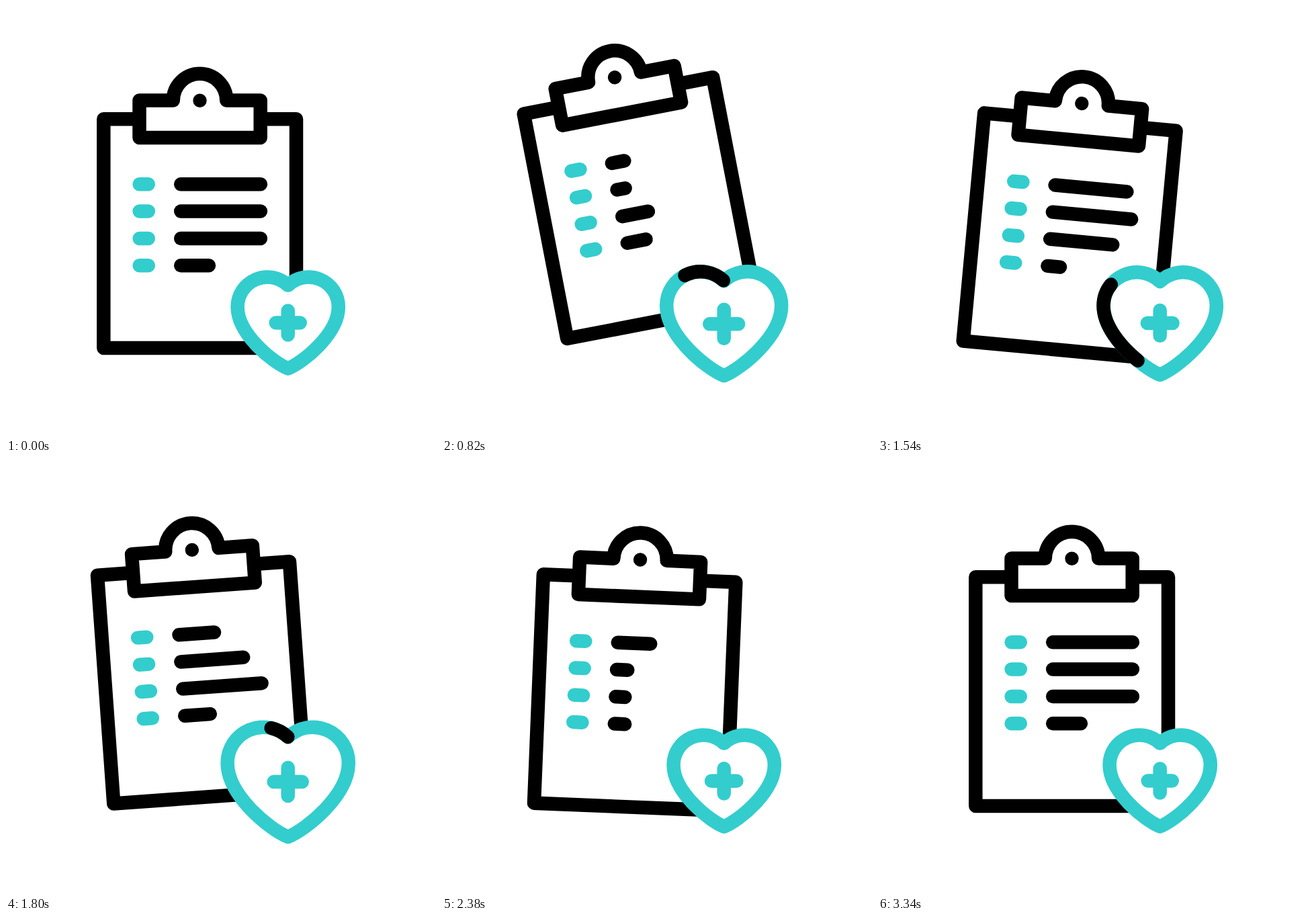
Animation of 640 by 640 pixels, one loop 3600 ms. Source, as an HTML page:

```html
<!DOCTYPE html>
<html lang="en">
<head>
<meta charset="utf-8">
<title>Health checklist</title>
<style>
  html, body { margin: 0; width: 100%; height: 100%; overflow: hidden; background: #fff; }
  svg { display: block; width: 100vw; height: 100vh; }
  .ink, .teal { fill: none; stroke: #000; stroke-width: 20.5; stroke-linecap: round; stroke-linejoin: round; }
  .teal { stroke: #33cdcd; }
  .paper { fill: #fff; }
</style>
</head>
<body>
<svg viewBox="0 0 640 640">
  <g id="board">
    <path class="ink paper" d="M145.3 168.3H432V509H145.3Z"/>
    <path class="ink paper" d="M198.5 140.5H248.8A39.7 39.7 0 0 1 328.2 140.5H378.7V196H198.5Z"/>
    <circle cx="288.5" cy="140.7" r="10.2"/>
  </g>
  <g id="heart"></g>
  <g id="plus"><path class="teal" d="M401.7 471.5h36M419.7 453.5v36"/></g>
</svg>
<script>
const LOOP = 3600, STROKE = 20.5;
const board = document.getElementById('board');
const heart = document.getElementById('heart');
const plus = document.getElementById('plus');

const smooth = x => (x = Math.min(1, Math.max(0, x)), x * x * (3 - 2 * x));
// Eased rise to 1 and back, each taking `half` ms
const bump = (t, start, half) => smooth(1 - Math.abs(t - start - half) / half);
const twoBumps = (t, half) => bump(t, 0, half) + bump(t, 2 * half, half);

function addPath(parent, kind, d) {
  const p = document.createElementNS('http://www.w3.org/2000/svg', 'path');
  p.setAttribute('class', kind);
  p.setAttribute('d', d);
  return parent.appendChild(p);
}

// Checklist rows: a teal bullet and a line that is rewritten
const rows = [];
for (let i = 0; i < 4; i++) {
  const y = 265.3 + 40.3 * i;
  addPath(board, 'teal', `M198.6 ${y}h13.2`);
  rows.push({ y, length: i < 3 ? 118.7 : 41.7, path: addPath(board, 'ink', '') });
}

const heartShape = 'M419.7 415.8A44.4 44.4 0 0 1 494.8 448C494.8 488 442.4 530.5 419.7 539.6' +
  'C397 530.5 344.6 488 344.6 448A44.4 44.4 0 0 1 419.7 415.8Z';
addPath(heart, 'teal paper', heartShape);
const runs = [0, 914].map(start => {
  const path = addPath(heart, 'ink', heartShape);
  path.setAttribute('pathLength', 1);
  return { start, path };
});

// Five half swings, each smaller and quicker than the one before
function swing(t) {
  let start = 154, from = 0;
  for (let n = 0; n < 5; n++) {
    const time = 625 - 24 * n * n;
    const to = 2.8 * (4 - n) * (n % 2 ? 1 : -1);
    if (t < start + time) return from + (to - from) * smooth((t - start) / time);
    start += time;
    from = to;
  }
  return 0;
}

// Scale a group while keeping its line weight
function grow(group, scale) {
  group.setAttribute('transform',
    `translate(419.7 462.5) scale(${scale}) translate(-419.7 -462.5)`);
  for (const p of group.children) p.style.strokeWidth = STROKE / scale;
}

function draw(t) {
  const hop = -43 * bump(t, 0, 600) - 10.5 * bump(t, 1550, 270);
  board.setAttribute('transform', `translate(0 ${hop}) rotate(${swing(t)} 248.6 302.7)`);

  rows.forEach(({ y, length, path }, i) => {
    const shown = 1 - .915 * twoBumps(t - 180 * i, 700);
    path.setAttribute('d', `M260.2 ${y}h${length * shown}`);
  });

  grow(heart, 1 + .2 * twoBumps(t, 600));
  grow(plus, 1 + .2 * twoBumps(t - 150, 600));

  for (const { start, path } of runs) {
    const head = smooth((t - start) / 840);
    const tail = smooth((t - start - 163) / 840);
    path.style.display = head - tail > .0005 ? '' : 'none';
    path.style.strokeDasharray = `${head - tail} 2`;
    path.style.strokeDashoffset = -tail;
  }
}

const begin = performance.now();
function tick() {
  draw((performance.now() - begin) % LOOP);
  requestAnimationFrame(tick);
}
tick();
</script>
</body>
</html>
```
